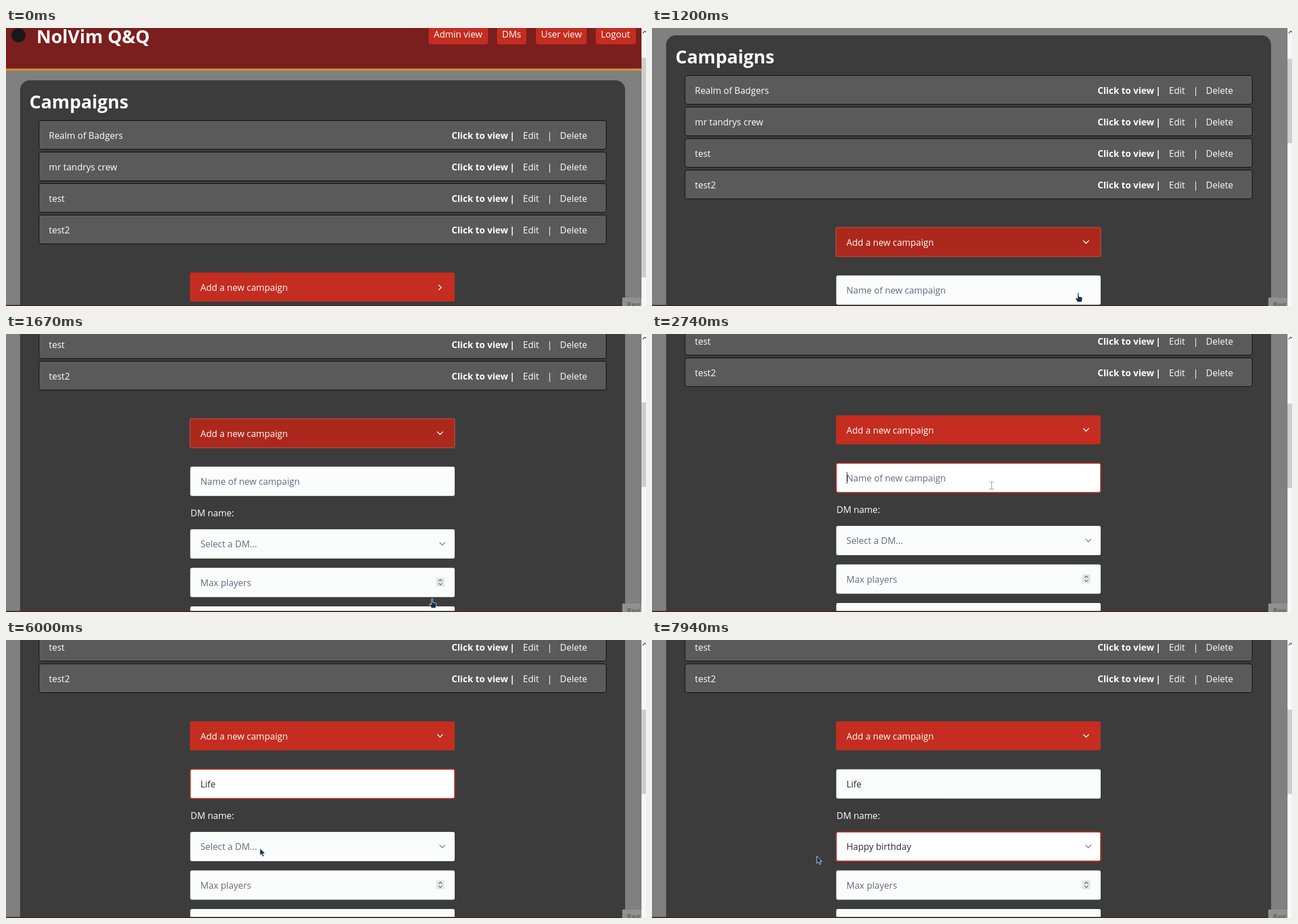
An HTML page that plays this animation: 1134 px wide and 494 px high, repeating every 8000 ms.

```html
<!DOCTYPE html>
<html lang="en">
<head>
<meta charset="utf-8">
<title>Campaigns</title>
<style>
  html, body { margin: 0; width: 100%; height: 100%; overflow: hidden; background: #808080; }
  svg { display: block; width: 100vw; height: 100vh; }
  text { font: 16px "Open Sans", "Noto Sans", sans-serif; fill: #fff; white-space: pre; }
  .bold { font-weight: 700; }
  .title { font-size: 32px; font-weight: 700; }
  .hint { fill: #626a7b; }
  .value { fill: #2b2a35; }
  .line { fill: none; stroke-width: 1.5; stroke-linecap: round; stroke-linejoin: round; }
</style>
</head>
<body>
<svg id="stage" viewBox="0 0 1134 494" preserveAspectRatio="none"></svg>
<script>
const LOOP = 8000;
const RED = '#c42d20', DARK_RED = '#ad281c', FIELD = '#fbfdfd';
const stage = document.getElementById('stage');

function add(parent, tag, attrs = {}, content) {
  const el = document.createElementNS('http://www.w3.org/2000/svg', tag);
  set(el, attrs);
  if (content !== undefined) el.textContent = content;
  return parent.appendChild(el);
}
function set(el, attrs) {
  for (const name in attrs) el.setAttribute(name, attrs[name]);
}
const group = parent => add(parent, 'g');
const box = (parent, x, y, width, height, fill, rx = 0, extra = {}) =>
  add(parent, 'rect', { x, y, width, height, fill, rx, ...extra });
const label = (parent, x, y, content, cls = '') => add(parent, 'text', { x, y, class: cls }, content);
const line = (parent, d, stroke) => add(parent, 'path', { d, stroke, class: 'line' });
const show = (el, visible) => { el.style.display = visible ? '' : 'none'; };

// Page content; it scrolls as one group
const page = group(stage);
box(page, 0, 0, 1134, 72, '#7b1e1e');
box(page, 0, 72, 1134, 4, '#d08c3c');
add(page, 'circle', { cx: 22, cy: 13, r: 12.5, fill: '#16181a' });
label(page, 54, 26.5, 'NolVim Q&Q', 'title');
[['Admin view', 749, 105], ['DMs', 870, 52], ['User view', 939, 90], ['Logout', 1045, 71]]
  .forEach(([name, x, width]) => {
    box(page, x, -23, width, 52, RED, 4);
    label(page, x + 9, 17, name);
  });

box(page, 25, 93, 1072, 1000, '#3c3c3c', 17);
label(page, 41.5, 143, 'Campaigns', 'title');
['Realm of Badgers', 'mr tandrys crew', 'test', 'test2'].forEach((name, i) => {
  const y = 164.5 + i * 56;
  box(page, 58.5, y, 1005, 51, '#5a5a5a', 4, { stroke: '#080808' });
  label(page, 76, y + 32, name);
  label(page, 789.5, y + 32, 'Click to view', 'bold');
  label(page, 892.5, y + 32, '|', 'bold');
  label(page, 916, y + 32, 'Edit');
  label(page, 959, y + 32, '|');
  label(page, 981.5, y + 32, 'Delete');
});

const button = box(page, 326, 434.5, 469, 51.5, RED, 3);
label(page, 344.5, 466.5, 'Add a new campaign');
const chevron = line(page, '', '#fff');

// Form
const form = group(page);
const field = y => box(form, 326.5, y, 468.5, 52, FIELD, 3);
const nameField = field(519.7);
const nameText = label(form, 344.5, 552);
const caret = box(form, 345, 535, 1, 21, '#222');
label(form, 327, 608, 'DM name:');
const select = field(631);
const selectText = label(form, 344.5, 663);
line(form, 'M768.5 654.5l4.6 4.6 4.6 -4.6', '#7d8594');
field(699.5);
label(form, 344.5, 732, 'Max players', 'hint');
box(form, 762, 717, 15, 16, '#e6e6ea');
line(form, 'M767 722.8l2.7 -2.8 2.7 2.8M767 727.2l2.7 2.8 2.7 -2.8', '#777');
field(768);

const menu = group(form);
box(menu, 327, 487, 467.5, 142.5, '#fff', 1, { stroke: '#b9b9b9', 'stroke-width': .8 });
const hover = box(menu, 331, 559, 460, 33.5, '#e9e9ec');
['Select a DM...', 'sam', 'Mr Tandry', 'Happy birthday'].forEach((name, i) =>
  label(menu, 336, 515 + i * 33.8, name, 'hint'));

// Fixed window parts
box(stage, 0, 492, 1126, 2, '#46282c');
box(stage, 1092, 479, 34, 15, '#919191');
label(stage, 1100, 496, 'Reg', 'bold').setAttribute('style', 'font-size:13px;fill:#656565');
box(stage, 1126, 0, 8, 494, '#f7f7f7');
const thumb = box(stage, 1126, 53, 8, 390, '#cdcdcd');
line(stage, 'M1128.5 9l3.5 -3.5 3.5 3.5', '#555');

// Pointers, drawn with the hot spot at 0,0
const pointers = {
  arrow: 'M0 0V13L3.1 10.2 5.2 15 7.4 14 5.3 9.4H9.2Z',
  hand: 'M-1 1Q0 -1 1.2 1V7L6.5 8.2Q8 8.7 7.6 10.5L6.4 17H-1L-4.6 11Q-4.6 9 -3 9.6L-1 11Z',
  beam: 'M-4 -7H-.8L0 -6.3 .8 -7H4V-5.8H.7V5.8H4V7H.8L0 6.3 -.8 7H-4V5.8H-.7V-5.8H-4Z'
};
const cursor = add(stage, 'path', { fill: '#123048', stroke: '#e8eef2', 'stroke-width': .9 });

const scrollKeys = [[0, 0], [1190, 0], [1200, 80], [1280, 122], [1330, 145], [1580, 145],
  [1590, 218], [1670, 284], [1740, 290], [LOOP, 290]];
// time, x, y
const cursorKeys = [
  [70, 942, 486], [440, 755, 470], [1800, 755, 470], [2210, 604, 266], [5150, 592, 284],
  [5530, 592, 284], [6000, 450, 370], [6220, 415, 376], [6340, 415, 378], [6820, 408, 303],
  [7090, 408, 300], [7160, 409, 303], [7290, 410, 312], [7550, 410, 315], [7940, 292, 384], [LOOP, 292, 384]
];
const typing = [[4530, 'L'], [4800, 'Li'], [5080, 'Lif'], [5150, 'Life']];
const STEP = 66;

function keyAt(keys, t) {
  let i = keys.length - 1;
  while (i > 0 && keys[i][0] > t) i--;
  return i;
}
const scrollAt = t => scrollKeys[keyAt(scrollKeys, t)][1];

function cursorAt(t) {
  const i = keyAt(cursorKeys, t);
  const [t0, x0, y0] = cursorKeys[i];
  const [t1, x1, y1] = cursorKeys[i + 1] || cursorKeys[i];
  const p = t1 > t0 ? Math.floor((t - t0) / STEP) * STEP / (t1 - t0) : 0;
  return [x0 + (x1 - x0) * p, y0 + (y1 - y0) * p];
}

function pointerKind(t, x, y) {
  if (t < 1800) return x < 795 && y < 486 ? 'hand' : 'arrow';
  const inside = x > 326 && x < 795;
  if (inside && y > 410 && y < 461) return 'beam';
  return inside && y > 229 && y < 282 && t < 5000 ? 'beam' : 'arrow';
}

const between = (t, a, b) => t >= a && t < b;
const setFocus = (el, on) => set(el, {
  fill: on ? '#fff' : FIELD, stroke: on ? RED : 'none', 'stroke-width': 1.8
});

function render(t) {
  const scroll = scrollAt(t), open = t >= 870;
  set(page, { transform: `translate(0 ${-scroll})` });
  set(thumb, open ? { y: 28.5 + scroll * .328, height: 150 } : { y: 53, height: 390 });
  show(form, open);

  const [x, y] = cursorAt(t);
  const buttonFocus = between(t, 870, 2740);
  const buttonHover = t >= 70 && t < 870 && x < 795 && y < 486;
  set(button, {
    fill: buttonFocus || buttonHover ? DARK_RED : RED,
    stroke: buttonFocus ? '#a4453b' : 'none', 'stroke-width': 2
  });
  set(chevron, { d: open ? 'M764.5 458l4.6 4.6 4.6 -4.6' : 'M766.8 456.7l4.4 4.4 -4.4 4.4' });

  const typed = t < typing[0][0] ? '' : typing[keyAt(typing, t)][1];
  nameText.textContent = typed || 'Name of new campaign';
  set(nameText, { class: typed ? 'value' : 'hint' });
  setFocus(nameField, between(t, 2740, 6220));
  const caretOn = between(t, 2740, 3200) || between(t, 3740, 4270) || between(t, 4530, 5680);
  show(caret, caretOn);
  if (caretOn) set(caret, { x: Math.round(344.5 + (typed ? nameText.getComputedTextLength() : 0)) });

  const chosen = t >= 7550;
  selectText.textContent = chosen ? 'Happy birthday' : 'Select a DM...';
  set(selectText, { class: chosen ? 'value' : 'hint' });
  setFocus(select, t >= 6220);
  show(menu, between(t, 6340, 7550));
  show(hover, t >= 7160);
  set(hover, { y: t < 7290 ? 559 : 592.5 });

  show(cursor, t >= 70 && !between(t, 4530, 5150));
  set(cursor, { d: pointers[pointerKind(t, x, y)], transform: `translate(${x} ${y})` });
}

const start = performance.now();
function frame() {
  render((performance.now() - start) % LOOP);
  requestAnimationFrame(frame);
}
frame();
</script>
</body>
</html>
```
